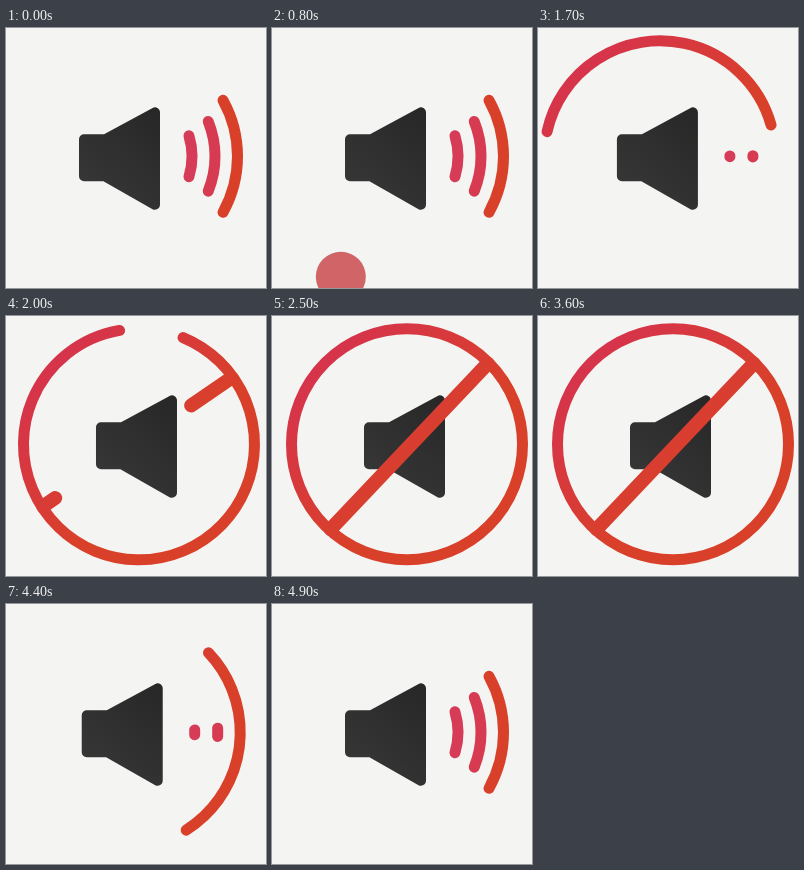
Write an HTML page with a canvas that moves like this. It is 260 by 260 pixels and loops after 5.05 s.

```html
<!DOCTYPE html>
<html lang="en">
<head>
<meta charset="utf-8">
<title>Mute toggle</title>
<style>
  html, body { margin: 0; width: 100%; height: 100%; overflow: hidden; background: #f4f4f2; }
  canvas { display: block; width: 260px; height: 260px; }
</style>
</head>
<body>
<canvas id="stage"></canvas>
<script>
const LOOP = 5050, STEP = 50, RADIUS = 115.5, CENTER_Y = 128.3;
const canvas = document.getElementById('stage');
const ctx = canvas.getContext('2d');
const ratio = window.devicePixelRatio || 1;
canvas.width = canvas.height = 260 * ratio;

const rad = degrees => degrees * Math.PI / 180;
const mix = (a, b, k) => a + (b - a) * k;
const clamp = x => Math.min(1, Math.max(0, x));

// Cubic bezier (.7, 0, .2, 1), solved by bisection.
function ease(x) {
  x = clamp(x);
  let low = 0, high = 1;
  for (let i = 0; i < 24; i++) {
    const u = (low + high) / 2, v = 1 - u;
    if (2.1 * v * v * u + 0.6 * v * u * u + u * u * u < x) low = u; else high = u;
  }
  return low * low * (3 - 2 * low);
}
const during = (t, start, length) => ease((t - start) / length);

function gradient(x0, y0, x1, y1, from, to) {
  const g = ctx.createLinearGradient(x0, y0, x1, y1);
  g.addColorStop(0, from);
  g.addColorStop(1, to);
  return g;
}
const red = gradient(-80, -80, 20, 20, '#d6344a', '#d9402a');
const dark = gradient(-40, 45, 40, -45, '#383838', '#272727');

function arc(radius, middle, half, color) {
  if (half < 0.1) return;
  ctx.beginPath();
  if (half > 179.9) ctx.arc(0, 0, radius, 0, 2 * Math.PI);
  else ctx.arc(0, 0, radius, rad(middle - half), rad(middle + half));
  ctx.lineWidth = 11;
  ctx.strokeStyle = color;
  ctx.stroke();
}

function speaker() {
  const corners = [[-38, -17], [-17, -17], [33, -44], [33, 48.5], [-17, 20], [-38, 20]];
  ctx.beginPath();
  corners.forEach(([x, y]) => ctx.lineTo(x, y));
  ctx.closePath();
  ctx.lineWidth = 10;
  ctx.fillStyle = ctx.strokeStyle = dark;
  ctx.fill();
  ctx.stroke();
}

// Two strokes grow inwards from the ring and meet below the middle.
function slash(angle, grown) {
  if (grown < 0.005) return;
  const end = 114, meet = -62, y = 8 * grown - 5;
  ctx.save();
  ctx.rotate(rad(angle));
  ctx.beginPath();
  ctx.moveTo(end, y);
  ctx.lineTo(mix(end, meet, grown), y);
  ctx.moveTo(-end, y);
  ctx.lineTo(mix(-end, meet, grown), y);
  ctx.restore();
  ctx.lineWidth = 14;
  ctx.strokeStyle = red;
  ctx.stroke();
}

function pointer(t) {
  if (t < 740 || t > 1420) return;
  const k = 1 - (1 - clamp((t - 740) / 420)) ** 2;
  const press = clamp((t - 1220) / 200);
  ctx.beginPath();
  ctx.arc(mix(46, 132, k), mix(285, 148.5, k), 25 - 6 * press, 0, 2 * Math.PI);
  ctx.fillStyle = `rgba(195, 45, 50, ${0.72 * (1 - press)})`;
  ctx.fill();
}

function pose(t) {
  if (t < 2600) {
    const p = during(t, 1190, 1240);
    return {
      muted: p, ring: -295 * p, angle: -46.5 + 115 * (1 - p),
      grown: during(t, 1760, 600), waves: 1 - during(t, 1200, 600)
    };
  }
  const p = during(t, 3600, 1300);
  return {
    muted: 1 - p, ring: 50 * (1 - p), angle: -46.5 - 212 * p,
    grown: 1 - during(t, 3640, 710), waves: during(t, 4200, 650)
  };
}

function draw(t) {
  const { muted, ring, angle, grown, waves } = pose(t);
  ctx.setTransform(ratio, 0, 0, ratio, 0, 0);
  ctx.fillStyle = '#f4f4f2';
  ctx.fillRect(0, 0, 260, 260);
  ctx.lineCap = ctx.lineJoin = 'round';
  ctx.save();
  ctx.translate(mix(116, 135, muted), CENTER_Y);
  speaker();
  arc(70, 0, 17 * waves, '#d63c58');
  arc(93, 0, 22 * waves, '#d73b52');
  arc(RADIUS, ring, mix(29, 180, muted), red);
  slash(angle, grown);
  ctx.restore();
  pointer(t);
}

function frame() {
  const t = performance.now() % LOOP;
  draw(Math.floor(t / STEP) * STEP);
  requestAnimationFrame(frame);
}
frame();
</script>
</body>
</html>
```
